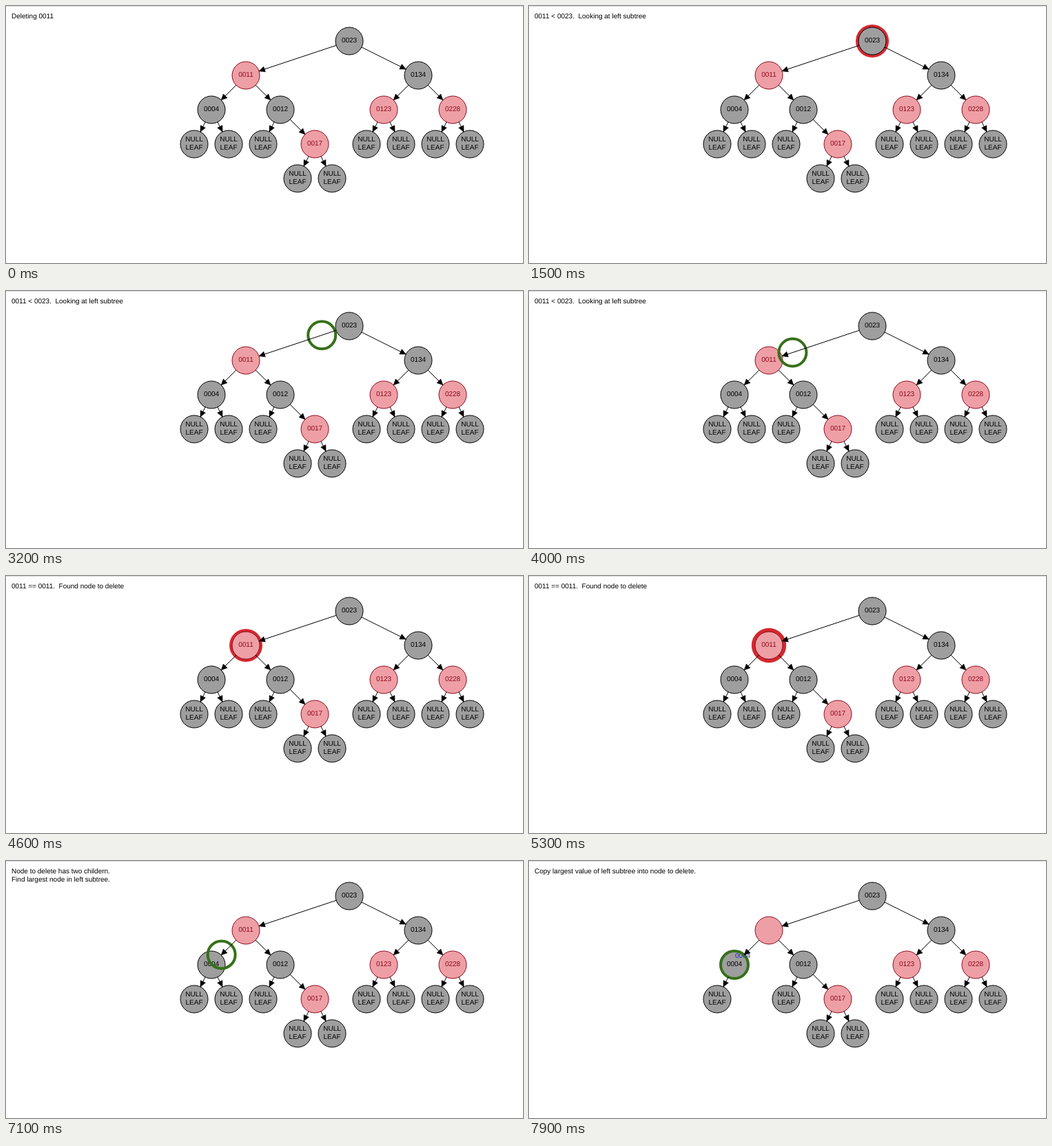
Write an HTML page that moves like this. It is 750 by 374 pixels and loops after 8000 ms.

```html
<!DOCTYPE html>
<html lang="en">
<head>
<meta charset="utf-8">
<title>Tree deletion</title>
<style>
  html, body { margin: 0; width: 100%; height: 100%; overflow: hidden; background: #fff; }
  svg { display: block; width: 750px; height: 374px; }
  text { font: 10px "Liberation Sans", Arial, sans-serif; text-rendering: geometricPrecision; white-space: pre; }
  .node text, #label { text-anchor: middle; }
  .node circle { fill: #9e9e9e; stroke: #000; }
  .red circle { fill: #ee9fa5; stroke: #8c0a1c; }
  .red text { fill: #8c0a1c; }
</style>
</head>
<body>
<svg id="stage" viewBox="0 0 750 374">
  <rect width="750" height="1" fill="#dcdcdc"/>
  <text x="8" y="18" id="line1"></text>
  <text x="8" y="30" id="line2"></text>
  <g id="nodes"></g>
  <text id="label" fill="#2a2ad0">0004</text>
  <g id="top"></g>
  <circle id="ring" r="20" fill="none" stroke="#36701a" stroke-width="4"/>
  <g id="edges"></g>
</svg>
<script>
const LOOP = 8000, FRAME = 100, RADIUS = 20, MOVE = 1583;
const $ = id => document.getElementById(id);

function make(parent, tag, attrs, text) {
  const el = document.createElementNS("http://www.w3.org/2000/svg", tag);
  for (const key in attrs) el.setAttribute(key, attrs[key]);
  if (text) el.textContent = text;
  return parent.appendChild(el);
}

function set(el, attrs) {
  for (const key in attrs) el.setAttribute(key, attrs[key]);
}

function show(el, on) {
  el.style.display = on ? "" : "none";
}

function addNode(x, level, value, red) {
  const y = 51 + 50 * level;
  const group = make($("nodes"), "g", { class: red ? "node red" : "node" });
  make(group, "circle", { cx: x, cy: y, r: RADIUS });
  const lines = value ? [[value, 2.4]] : [["NULL", -3.6], ["LEAF", 8.4]];
  const texts = lines.map(([s, dy]) => make(group, "text", { x, y: y + dy }, s));
  return { x, y, group, text: texts[0] };
}

function addEdge(from, to) {
  const dx = to.x - from.x, dy = to.y - from.y, len = Math.hypot(dx, dy);
  const ux = dx / len, uy = dy / len;
  const tipX = to.x - RADIUS * ux, tipY = to.y - RADIUS * uy;
  const baseX = tipX - 8.5 * ux, baseY = tipY - 8.5 * uy;
  const group = make($("edges"), "g", { stroke: "#000" });
  make(group, "line", { x1: from.x + RADIUS * ux, y1: from.y + RADIUS * uy, x2: tipX, y2: tipY });
  make(group, "path", {
    d: `M${tipX} ${tipY}L${baseX - 4 * uy} ${baseY + 4 * ux}L${baseX + 4 * uy} ${baseY - 4 * ux}Z`,
    "stroke-width": 0.6
  });
  return group;
}

function addChild(parent, x, level, value, red) {
  const node = addNode(x, level, value, red);
  node.edge = addEdge(parent, node);
  return node;
}

const root = addNode(498, 0, "0023");
const doomed = addChild(root, 348, 1, "0011", true);
const right = addChild(root, 598, 1, "0134");
const donor = addChild(doomed, 298, 2, "0004");
const inner = addChild(doomed, 398, 2, "0012");
const low = addChild(right, 548, 2, "0123", true);
const high = addChild(right, 648, 2, "0228", true);
addChild(donor, 273, 3);
const donorLeaf = addChild(donor, 323, 3);
addChild(inner, 373, 3);
const deep = addChild(inner, 448, 3, "0017", true);
for (const parent of [low, high, deep]) {
  const level = parent === deep ? 4 : 3;
  addChild(parent, parent.x - 25, level);
  addChild(parent, parent.x + 25, level);
}

for (const node of [root, doomed]) {
  node.halo = make(node.group, "circle", { cx: node.x, cy: node.y, style: "fill:#d4282f;stroke:none" });
  node.group.prepend(node.halo);
}

const lookLeft = ["0011 < 0023.  Looking at left subtree"];
const steps = [
  { start: 0, message: ["Deleting 0011"] },
  { start: 1200, message: lookLeft, lit: root },
  { start: 2780, message: lookLeft, path: [root, doomed] },
  { start: 4370, message: ["0011 == 0011.  Found node to delete"], lit: doomed },
  { start: 5980, message: ["Node to delete has two childern.", "Find largest node in left subtree."], path: [doomed, donor] },
  { start: 7520, message: ["Copy largest value of left subtree into node to delete."], path: [donor, donor], copying: true }
];

function between(a, b, p) {
  return { x: a.x + (b.x - a.x) * p, y: a.y + (b.y - a.y) * p };
}

// Triangle wave between 3 and 7 px.
function haloWidth(t) {
  const period = 1773, phase = ((t - 381 + period) % period) / period;
  return 3 + 4 * Math.abs(1 - 2 * phase);
}

function draw(t) {
  const step = steps.filter(s => s.start <= t).pop();
  const progress = Math.min(1, (t - step.start) / MOVE);
  const copying = !!step.copying;

  $("line1").textContent = step.message[0];
  $("line2").textContent = step.message[1] || "";

  for (const node of [root, doomed]) {
    show(node.halo, step.lit === node);
    node.halo.setAttribute("r", RADIUS + haloWidth(t));
  }

  show($("ring"), step.path);
  if (step.path) {
    const at = between(...step.path, progress);
    set($("ring"), { cx: at.x, cy: at.y });
  }

  show(doomed.text, !copying);
  show(donorLeaf.group, !copying);
  show(donorLeaf.edge, !copying);
  show($("label"), copying);
  const at = between(donor, doomed, progress);
  set($("label"), { x: at.x, y: at.y + 2.4 });
}

function tick() {
  const t = performance.now() % LOOP;
  draw(Math.floor(t / FRAME) * FRAME);
  requestAnimationFrame(tick);
}
tick();
</script>
</body>
</html>
```
